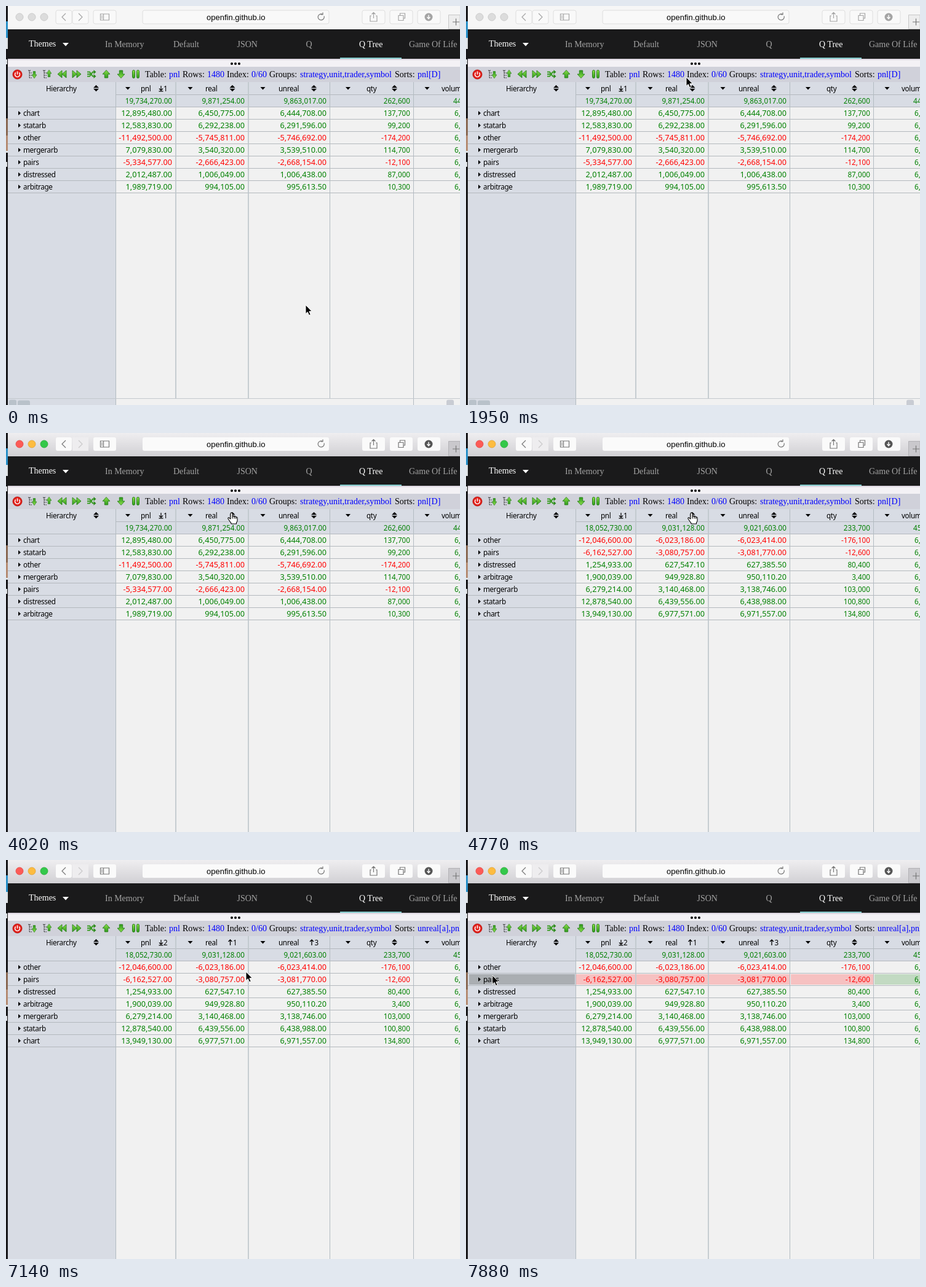
These frames come from a looping animation (738 by 650 pixels, 8 s). An HTML page:

```html
<!DOCTYPE html>
<html lang="en">
<head>
<meta charset="utf-8">
<title>Pivot grid sorting</title>
<style>
html, body { margin: 0; width: 100%; height: 100%; overflow: hidden; background: #f1f1f1; }
svg { display: block; }
text { white-space: pre; }
.serif { font: 14px "Liberation Serif", serif; }
.grid { font: 11.7px "Noto Sans", sans-serif; }
.label { letter-spacing: -.35px; }
.big { font-size: 12.7px; }
.num { text-anchor: end; }
.up { fill: #008000; }
.down { fill: #f00; }
.blue { fill: #00f; }
.line { fill: none; stroke: #777; stroke-width: 1.2; }

/* hard switches: .on appears and .off vanishes at the named moment */
.on { --a: 0; --b: 1; }
.off { --a: 1; --b: 0; }
.focus, .resort, .first, .second, .third, .hover, .arrow, .hand, .bar, .mouse {
  animation: 8s step-end infinite;
}
.focus { animation-name: focus; }
.resort { animation-name: resort; }
.first { animation-name: first; }
.second { animation-name: second; }
.third { animation-name: third; }
.hover { animation-name: hover; }
.arrow, .hand { animation-name: pointer; }
.bar { animation-name: bar; }
.mouse { animation-name: mouse; }
@keyframes focus { 0% { opacity: var(--a) } 37.25%, 100% { opacity: var(--b) } }
@keyframes resort { 0% { opacity: var(--a) } 59.625%, 100% { opacity: var(--b) } }
@keyframes first { 0% { opacity: var(--a) } 63.375%, 100% { opacity: var(--b) } }
@keyframes second { 0% { opacity: var(--a) } 83.625%, 100% { opacity: var(--b) } }
@keyframes third { 0% { opacity: var(--a) } 87.375%, 100% { opacity: var(--b) } }
@keyframes hover { 0% { opacity: var(--a) } 91.125%, 100% { opacity: var(--b) } }
@keyframes pointer {
  0% { opacity: var(--a) } 46.5% { opacity: var(--b) } 87.375%, 100% { opacity: var(--a) }
}
@keyframes bar { 0% { opacity: 1 } 46.5% { opacity: .65 } 48.375% { opacity: .3 } 50.25%, 100% { opacity: 0 } }
@keyframes mouse {
  0% { transform: translate(487px, 487px) }
  15% { transform: translate(482px, 476px) }
  16.75% { transform: translate(452px, 415px) }
  18.625% { transform: translate(405px, 300px) }
  20.5% { transform: translate(362px, 195px) }
  22.5% { transform: translate(350px, 132px) }
  24.375% { transform: translate(358px, 116px) }
  26.125% { transform: translate(363px, 125px) }
  28% { transform: translate(365px, 130px) }
  31.75% { transform: translate(365px, 131px) }
  46.5% { transform: translate(367px, 130px) }
  67.125% { transform: translate(372px, 130px) }
  68.875% { transform: translate(392px, 131px) }
  70.75% { transform: translate(430px, 132px) }
  72.625% { transform: translate(465px, 131px) }
  74.375% { transform: translate(488px, 131px) }
  76.25% { transform: translate(499px, 130px) }
  78.125% { transform: translate(501px, 130px) }
  87.375% { transform: translate(490px, 144px) }
  89.25% { transform: translate(390px, 182px) }
  91.125% { transform: translate(250px, 187px) }
  93% { transform: translate(155px, 167px) }
  94.875% { transform: translate(95px, 173px) }
  96.625% { transform: translate(56px, 183px) }
  98.5%, 100% { transform: translate(43px, 188px) }
}
</style>
</head>
<body>
<svg width="738" height="650" viewBox="0 0 738 650">
  <defs>
    <linearGradient id="bar" x2="0" y2="1">
      <stop offset="0" stop-color="#efeef0"/><stop offset="1" stop-color="#d1d0d4"/>
    </linearGradient>
    <linearGradient id="leaf" x2="0" y2="1">
      <stop offset="0" stop-color="#8ce04a"/><stop offset="1" stop-color="#2f9a1c"/>
    </linearGradient>
    <path id="sort" d="M-4.5-.8L0-5.3 4.5-.8zM-4.5.8L0 5.3 4.5.8z"/>
    <path id="drop" d="M-4-2h8L0 2.5z"/>
    <path id="asc" d="M0 4.5V-4.5M-3-1.5L0-4.5 3-1.5" fill="none" stroke="#000" stroke-width="1.3"/>
    <path id="desc" d="M0-4.5V3M-3 0L0 3 3 0M-3.5 4.3h7" fill="none" stroke="#000" stroke-width="1.2"/>
    <path id="shoot" d="M0-6.5L6 0H2.7V6H-2.7V0H-6z" fill="url(#leaf)" stroke="#28801a" stroke-width=".9"/>
    <path id="skip" d="M-7 0L0-6V6zM0 0L7-6V6z" fill="url(#leaf)" stroke="#28801a" stroke-width=".9"/>
    <g id="dots" fill="none" stroke="#222" stroke-width="1.2" stroke-dasharray="1.4 1.2">
      <path d="M-7-6h4M-5-6V6M-5-2h4M-5 2h4M-5 6h5"/>
    </g>
    <g id="lamps"><circle cx="22" cy="18" r="6"/><circle cx="42" cy="18" r="6"/><circle cx="62" cy="18" r="6"/></g>
    <g id="buttons">
      <rect x="81" y="7" width="26" height="22" rx="3"/><rect x="108" y="7" width="26" height="22" rx="3"/>
      <rect x="142" y="7" width="37" height="22" rx="3"/><rect x="222" y="7" width="303" height="22" rx="3"/>
      <rect x="579" y="7" width="37" height="22" rx="3"/><rect x="624" y="7" width="37" height="22" rx="3"/>
      <rect x="669" y="7" width="37" height="22" rx="3"/>
    </g>
    <g id="glyphs" class="line">
      <path d="M97 12l-6 6 6 6"/>
      <path d="M153.500 13h14v10h-14zM158.500 13v10M155 16h2M155 18h2M155 20h2"/>
      <path d="M594 16h-2v9h11v-9h-2M597.500 20v-9M594.500 13.500l3-3 3 3"/>
      <path d="M638 15.500h8v8h-8zM640.500 15v-3h8v8h-2.500"/>
    </g>
  </defs>

  <!-- desktop sliver -->
  <path fill="#17171a" d="M0 0h3v650H0z"/>
  <path fill="#2a90c8" d="M0 25h3v27H0z"/>
  <path fill="#dfe3e6" d="M0 52h3v18H0zM0 87h2v8H0zM0 236h3v3H0zM0 254h2v8H0z"/>
  <path fill="#8a6a55" d="M0 183h3v28H0z"/>
  <path fill="#b58c74" d="M0 211h3v25H0z"/>

  <!-- browser bar -->
  <path fill="#f6f6f6" d="M3 0h735v38H3z"/>
  <g class="focus off">
    <use href="#lamps" fill="#dcdcdc" stroke="#c9c9c9"/>
    <use href="#buttons" fill="#f9f9f9" stroke="#dedede"/>
    <path d="M719.500 14.500H738V37.500H719.500z" fill="#ededed" stroke="#c8c8c8"/>
    <g opacity=".65"><use href="#glyphs"/><path class="line" d="M118 12l6 6-6 6"/>
      <circle cx="687" cy="18" r="6.500" fill="#777"/></g>
  </g>
  <g class="focus on">
    <path fill="url(#bar)" d="M3 0h735v38H3z"/>
    <g stroke-width=".8">
      <circle cx="22" cy="18" r="6" fill="#fc5b57" stroke="#e2463f"/>
      <circle cx="42" cy="18" r="6" fill="#fdbc40" stroke="#e0a032"/>
      <circle cx="62" cy="18" r="6" fill="#34c84a" stroke="#27aa35"/>
    </g>
    <use href="#buttons" fill="#fafafa"/>
    <path d="M108 7h26v22h-26z" fill="#eeedef"/>
    <path class="line" stroke-opacity=".3" d="M118 12l6 6-6 6"/>
    <path d="M719.500 13.500H738V37.500H719.500z" fill="#c9c8cc" stroke="#b2b1b5"/>
    <use href="#glyphs"/>
    <circle cx="687" cy="18" r="6.500" fill="#555"/>
  </g>
  <path d="M687 14.500v6M684.500 18l2.500 3 2.500-3" fill="none" stroke="#fff" stroke-width="1.400"/>
  <path class="line" d="M517 16.500a5 5 0 1 1-2.500-3M515 10.500v3.500h-3.500M726 26h11M731.500 20.500v11"/>
  <text x="326" y="23" style="font: 13px 'Liberation Sans', sans-serif">openfin.github.io</text>

  <!-- site tabs -->
  <path fill="#1a1a1b" d="M3 38h735v48H3z"/>
  <path fill="#7cc5c6" d="M543 84h100v2H543z"/>
  <path fill="#fff" d="M92 60h10l-5 5.500z"/>
  <g class="serif" fill="#a3a3a3">
    <text x="37" y="65.500" fill="#fff">Themes</text>
    <text x="161" y="67">In Memory</text>
    <text x="272" y="67">Default</text>
    <text x="375.500" y="67">JSON</text>
    <text x="487.500" y="67">Q</text>
    <text x="574" y="67" fill="#fff">Q Tree</text>
    <text x="655" y="67">Game Of Life</text>
  </g>

  <!-- grid toolbar -->
  <path fill="#f3f1f5" d="M3 86h735v13H3z"/>
  <path fill="#d9d2de" d="M3 86.500h735v1.500H3z"/>
  <path fill="#d0d1da" d="M3 99h735v25H3z"/>
  <g><circle cx="367" cy="94" r="2"/><circle cx="373" cy="94" r="2"/><circle cx="379" cy="94" r="2"/></g>
  <circle cx="18.500" cy="111.500" r="7.500" fill="#e3201b" stroke="#b81510"/>
  <path d="M15.800 108.500a4 4 0 1 0 5.400 0M18.500 106.500v5" fill="none" stroke="#fff" stroke-width="1.500"/>
  <use href="#dots" x="43" y="111"/><use href="#dots" x="67" y="111"/>
  <use href="#shoot" transform="translate(46 112) scale(.65 -.9)"/>
  <use href="#shoot" transform="translate(70 110) scale(.65 .9)"/>
  <use href="#skip" x="91" y="111"/>
  <use href="#skip" transform="translate(115 111) scale(-1 1)"/>
  <path d="M132 107.500h4l5 7h4M132 114.500h4l5-7h4M132 111h5" fill="none" stroke="#3b9d25" stroke-width="2"/>
  <path d="M142.500 104l4 3.500-4 3.500zM142.500 111l4 3.500-4 3.500z" fill="#2f8a1f"/>
  <use href="#shoot" x="163" y="111"/>
  <use href="#shoot" transform="translate(187 111) scale(1 -1)"/>
  <g fill="url(#leaf)" stroke="#28801a"><rect x="205.500" y="104.500" width="4" height="13" rx="2"/><rect x="212.500" y="104.500" width="4" height="13" rx="2"/></g>
  <g class="serif">
    <text x="226" y="116">Table:</text><text x="265" y="116" class="blue">pnl</text>
    <text x="287" y="116">Rows:</text><text x="327" y="116" class="blue">1480</text>
    <text x="359" y="116">Index:</text><text x="399" y="116" class="blue">0/60</text>
    <text x="428" y="116">Groups:</text><text x="478" y="116" class="blue">strategy,unit,trader,symbol</text>
    <text x="632" y="116">Sorts:</text>
    <g class="blue">
      <text x="669" y="116" class="first off">pnl[D]</text>
      <g class="first on"><text x="669" y="116" class="third off">real[a],pnl[D]</text></g>
      <text x="669" y="116" class="third on">unreal[a],pnl[D]</text>
    </g>
  </g>

  <!-- grid -->
  <path fill="#f1f1f1" d="M179 164h559v486H179z"/>
  <path fill="#d8dce4" d="M3 124h735v40H3zM3 164h175v486H3z"/>
  <g class="hover on">
    <path fill="#aaaeb2" d="M5 186h172v17H5z"/>
    <path fill="#f6c1c1" d="M179 186h96v17h-96zM277 186h116v17H277zM395 186h131v17H395zM528 186h134v17H528z"/>
    <path fill="#c2dac2" d="M664 186h74v17h-74z"/>
  </g>
  <path id="rules" fill="none" stroke="#b3b8bd"/>
  <path d="M178.500 124V650M526.500 124V650M662.500 124V650" stroke="#b3bbc1"/>
  <path d="M276 124V650M394 124V650" stroke="#bfc7cc" stroke-width="1.700"/>

  <g class="grid label" id="head">
    <text x="65" y="139">Hierarchy</text>
    <text x="219" y="139">pnl</text><text x="324" y="139">real</text>
    <text x="443" y="139">unreal</text><text x="586" y="139">qty</text><text x="708" y="139">volume</text>
    <use href="#drop" x="198" y="134"/><use href="#drop" x="299.500" y="134"/><use href="#drop" x="417.500" y="134"/>
    <use href="#drop" x="556" y="134"/><use href="#drop" x="684.500" y="134"/>
    <use href="#sort" x="146.500" y="134"/><use href="#sort" x="631.500" y="134"/>
    <use href="#desc" x="252" y="134.500"/>
    <text x="256" y="139" class="second off">1</text>
    <text x="256" y="139" class="second on">2</text>
    <use href="#sort" x="368" y="134" class="first off"/>
    <g class="first on">
      <use href="#asc" x="364.500" y="134.500"/>
      <text x="369" y="139" class="second off">2</text>
      <text x="369" y="139" class="second on">1</text>
    </g>
    <use href="#sort" x="500.500" y="134" class="second off"/>
    <g class="second on"><use href="#asc" x="497" y="134.500"/><text x="501.500" y="139">3</text></g>
  </g>
  <g class="grid resort off" id="before"></g>
  <g class="grid resort on" id="after"></g>

  <!-- scroll bar -->
  <g class="bar">
    <path fill="#d8dce4" d="M3 640h175v10H3z"/>
    <path fill="#f1f1f1" d="M179 640h483v10H179zM663 640h75v10h-75z"/>
    <path d="M3 639.500h735" stroke="#c3c8cd"/>
    <g fill="#b9c2ca"><rect x="5" y="641.500" width="12" height="14" rx="3"/><rect x="19" y="642.500" width="20" height="14" rx="3"/></g>
    <rect x="716" y="641.500" width="12" height="14" rx="3" fill="#c9ccd3"/>
  </g>

  <g class="mouse">
    <path class="arrow off" d="M0 0V14.500L3.300 11.500 5.600 16.800 8.200 15.700 5.900 10.600H10.300z" stroke="#fff" stroke-width="1"/>
    <path class="hand on" fill="#fff" stroke="#000" stroke-width="1.100" stroke-linejoin="round"
      d="M-2 10V1.500a1.600 1.600 0 0 1 3.200 0V6q1.500-1.300 3 .2 1.500-.8 2.700.6 2.200-.3 2.200 1.900v3.800q-.4 2.500-1.600 3.500v2H-.7q-.5-2-2.500-4.200L-6 9.700q-.6-2 1.300-1.900z M1.200 6v3.500M4.200 6.300v3.200M6.900 7v3"/>
  </g>
</svg>
<script>
const edges = [270, 388, 521, 657];
const NS = 'http://www.w3.org/2000/svg';
const get = id => document.getElementById(id);

function add(parent, tag, attrs, content = '') {
  const el = document.createElementNS(NS, tag);
  for (const key in attrs) el.setAttribute(key, attrs[key]);
  el.textContent = content;
  parent.append(el);
}

function fill(id, volume, lines) {
  const box = get(id);
  lines.forEach((line, i) => {
    const [name, ...cells] = line.split(' ');
    const y = 159 + i * 20;
    const size = i ? ' big' : '';
    if (i) {
      add(box, 'path', { d: `M20 ${y - 8}l4 3.500-4 3.500z` });
      add(box, 'text', { x: 28, y, class: 'label' }, name);
    }
    cells.forEach((cell, c) => {
      const tone = cell[0] === '-' ? 'down' : 'up';
      // quantities are set in the smaller size
      add(box, 'text', { x: edges[c], y, class: `num ${tone}${c < 3 ? size : ''}` }, cell);
    });
    add(box, 'text', { x: i ? 729 : 727, y, class: 'up' }, i ? '6,000' : volume);
  });
}

get('rules').setAttribute('d',
  'M179 144.500H738' + Array.from({ length: 8 }, (_, i) => `M3 ${164.5 + i * 20}H738`).join(''));

fill('before', '44,100', [
  'total 19,734,270.00 9,871,254.00 9,863,017.00 262,600',
  'chart 12,895,480.00 6,450,775.00 6,444,708.00 137,700',
  'statarb 12,583,830.00 6,292,238.00 6,291,596.00 99,200',
  'other -11,492,500.00 -5,745,811.00 -5,746,692.00 -174,200',
  'mergerarb 7,079,830.00 3,540,320.00 3,539,510.00 114,700',
  'pairs -5,334,577.00 -2,666,423.00 -2,668,154.00 -12,100',
  'distressed 2,012,487.00 1,006,049.00 1,006,438.00 87,000',
  'arbitrage 1,989,719.00 994,105.00 995,613.50 10,300'
]);
fill('after', '45,100', [
  'total 18,052,730.00 9,031,128.00 9,021,603.00 233,700',
  'other -12,046,600.00 -6,023,186.00 -6,023,414.00 -176,100',
  'pairs -6,162,527.00 -3,080,757.00 -3,081,770.00 -12,600',
  'distressed 1,254,933.00 627,547.10 627,385.50 80,400',
  'arbitrage 1,900,039.00 949,928.80 950,110.20 3,400',
  'mergerarb 6,279,214.00 3,140,468.00 3,138,746.00 103,000',
  'statarb 12,878,540.00 6,439,556.00 6,438,988.00 100,800',
  'chart 13,949,130.00 6,977,571.00 6,971,557.00 134,800'
]);
</script>
</body>
</html>
```
